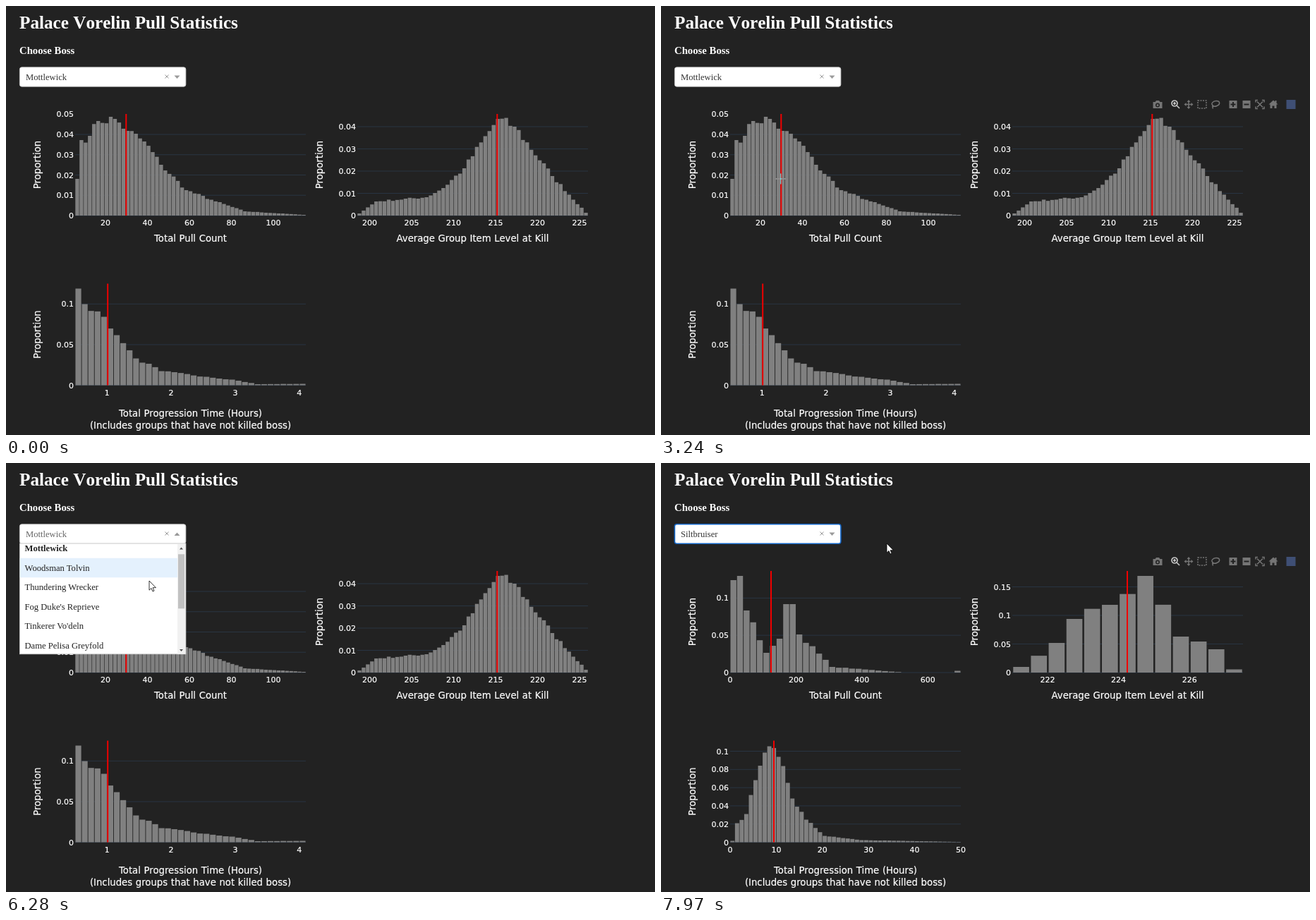
Animation of 920 by 608 pixels, one loop 8 s. Source, as an HTML page:

```html
<!DOCTYPE html>
<html lang="en">
<head>
<meta charset="utf-8">
<title>Pull Statistics</title>
<style>
html, body { margin: 0; width: 100%; height: 100%; overflow: hidden; background: #222; }
svg { display: block; width: 920px; height: 608px; font: 12.6px "Liberation Serif", serif; }
.head { font-weight: bold; font-kerning: none; fill: #fff; }
.plot text { font: 11px "DejaVu Sans", sans-serif; fill: #fff; stroke: #fff; stroke-width: .2; }
.plot .title { font-size: 13.25px; word-spacing: .03em; text-anchor: middle; }
.tip text { font: 10.2px "Liberation Sans", sans-serif; }
.cross { stroke: #fff; fill: none; }
</style>
</head>
<body>
<svg id="stage" viewBox="0 0 920 608"></svg>
<script>
const LOOP = 8000, ROW = 27.5, MENU_TOP = 114, MAX_SCROLL = 118, SWITCH = 7770;
const PLOT_W = 327, PLOT_H = 144;
const bosses = ["Mottlewick", "Woodsman Tolvin", "Thundering Wrecker", "Fog Duke's Reprieve",
  "Tinkerer Vo'deln", "Dame Pelisa Greyfold", "The Assembly of Ash", "Siltbruiser",
  "Brass Cohort Marshals", "Lord Calvorien"];

// Left edge, base line, x title lines
const slots = [
  [98, 297, ["Total Pull Count"]],
  [498, 297, ["Average Group Item Level at Kill"]],
  [98, 537.5, ["Total Progression Time (Hours)", "(Includes groups that have not killed boss)"]]
];

// y: step, pixels per step, count; x: first value, step, first pixel, pixels per step, count
// shape: [bin, height] at the bends of the histogram outline
const before = [
  { y: [.01, 28.75, 5], x: [20, 20, 141, 59.5, 5], red: 170.3, bins: 55,
    shape: [[0, 52], [1, 107], [3, 113], [5, 134], [9, 137], [12, 120], [16, 105], [20, 72], [26, 36],
      [33, 20.1085], [40, 6], [54, 1]] },
  { y: [.01, 31.5, 4], x: [200, 5, 515.5, 59.5, 6], red: 696.3, bins: 55,
    shape: [[0, 3], [4, 20], [16, 26], [20, 39], [25, 67], [33, 137], [37, 126], [46, 56], [54, 4]] },
  { y: [.05, 57.6, 2], x: [1, 1, 143.3, 90.8, 4], red: 144.2, bins: 36,
    shape: [[0, 137], [1, 115], [4, 97], [6, 71], [9, 38], [13, 20], [20, 12], [24, 8], [28, 1.5], [35, 2]] }
];
const after = [
  { y: [.05, 52.8, 2], x: [0, 200, 98, 93.4, 4], red: 156, bins: 35,
    shape: [[0, 131], [1, 137], [2, 88], [5, 28], [7, 48], [8, 97], [9, 97], [10, 54], [15, 8], [26, 0],
      [33, 0], [34, 2.5]] },
  { y: [.05, 40.5, 3], x: [222, 2, 548, 100.6, 3], red: 661, bins: 13,
    shape: [[0, 8], [2, 42], [3, 76], [5, 96], [7, 137], [9, 51], [11, 33], [12, 4.5]] },
  { y: [.02, 25.8, 5], x: [0, 10, 98, 65.4, 6], red: 160, bins: 50,
    shape: [[0, 2], [1, 27], [3, 40], [5, 88], [8, 136], [11, 108], [13, 62], [16, 32], [20, 9], [28, 3],
      [49, .5]] }
];

// Cursor path: time, x, y
const track = [[530, 916, 596], [1330, 521, 360], [1600, 405, 292], [2050, 280, 271], [2380, 213, 247],
  [3060, 177, 245], [3240, 170, 245], [3830, 133, 239], [4300, 127, 223], [4970, 212, 114],
  [5360, 203, 98], [5830, 203, 98], [6250, 203, 167], [6690, 203, 167], [6970, 166, 202],
  [7600, 166, 202], [7940, 320, 114]];

const ramp = (t, a, b) => Math.min(1, Math.max(0, (t - a) / (b - a)));
const within = (t, a, b) => t >= a && t < b;

// Linear interpolation of rows [key, ...values]
function along(rows, key) {
  const i = Math.max(1, rows.findIndex(r => r[0] >= key));
  const b = key > rows[rows.length - 1][0] ? rows[rows.length - 1] : rows[i], a = rows[rows.indexOf(b) - 1];
  const p = ramp(key, a[0], b[0]);
  return a.slice(1).map((v, k) => v + (b[k + 1] - v) * p);
}

let seed = 7;
const random = () => (seed = seed * 16807 % 2147483647) / 2147483647;

// Bends keep their height, bars between them vary a little
const heights = ({ shape, bins }) => Array.from({ length: bins }, (_, i) => {
  const jitter = shape.some(s => s[0] === i) ? 1 : .94 + .12 * random();
  return along(shape, i)[0] * jitter;
});
for (const c of [...before, ...after]) c.h = heights(c);

const rect = (x, y, w, h, fill, more = "") =>
  `<rect x="${x}" y="${y}" width="${w}" height="${h}" fill="${fill}" ${more}/>`;
const text = (x, y, s, more = "") => `<text x="${x}" y="${y}" ${more}>${s}</text>`;
const path = (d, more = "") => `<path d="${d}" ${more}/>`;

function chart({ y, x, red, h }, i) {
  const [left, base, titles] = slots[i], w = PLOT_W / h.length;
  let s = "";
  for (let k = 0; k <= y[2]; k++) {
    const rise = k * y[1];
    if (rise < PLOT_H - 1) s += path(`M${left} ${base - rise}h${PLOT_W}`, 'stroke="#283442"');
    s += text(left - 2, base - rise + 4, +(k * y[0]).toFixed(2), 'text-anchor="end"');
  }
  h.forEach((v, k) => s += rect(left + (k + .05) * w, base - v, w * .9, v, "#808080"));
  for (let k = 0; k < x[4]; k++)
    s += text(x[2] + k * x[3], base + 14, x[0] + k * x[1], 'text-anchor="middle"');
  s += path(`M${red} ${base - PLOT_H}V${base}`, 'stroke="#f00000" stroke-width="2"');
  s += text(0, 0, "Proportion", `class="title" transform="translate(${left - 49} ${base - 72}) rotate(-90)"`);
  const first = titles.length > 1 ? 44 : 36.5;
  titles.forEach((t, k) => s += text(left + PLOT_W / 2, base + first + k * 17, t, 'class="title"'));
  return s;
}

const icon = (x, d, more = "") => path(d, `transform="translate(${x} 139.5)" ${more}`);
const line = 'fill="none" stroke="#757575" stroke-width="1.5"';
const modebar =
  icon(704, "M-6.5-3.5h3l1.5-2h4l1.5 2h3v9h-13zM3 1a3 3 0 1 0-6 0a3 3 0 1 0 6 0M1.5 1a1.5 1.5 0 1 1-3 0a1.5 1.5 0 1 1 3 0", 'fill-rule="evenodd"') +
  icon(729, "M3-1.5a4 4 0 1 0-8 0a4 4 0 1 0 8 0M2 1.5l4 4M-3-1.5h4M-1-3.5v4", 'fill="none" stroke="#c4c4c4" stroke-width="1.7"') +
  icon(748, "M-5 0H5M0-5V5", line) +
  icon(748, "M-6.5 0l3-2.5v5zM6.5 0l-3-2.5v5zM0-6.5l-2.5 3h5zM0 6.5l-2.5-3h5z") +
  icon(767, "M-6-5.5H6V5.5H-6z", line + ' stroke-dasharray="2 1.5"') +
  icon(786, "M-3 2C-8-1-3-5 1-5C7-5 7 0 2 2C0 3-2 3-4 2C-5 4-3 4-4 6", line) +
  icon(811, "M-5.5-5.5h11v11h-11zM-3.5-1v2h2.5v2.5h2v-2.5h2.5v-2h-2.5v-2.5h-2v2.5z", 'fill-rule="evenodd"') +
  icon(830, "M-5.5-5.5h11v11h-11zM-3.5-1v2h7v-2z", 'fill-rule="evenodd"') +
  icon(849, "M-6-3v-3h3M3-6h3v3M6 3v3h-3M-3 6h-3v-3M-4-4l8 8M4-4l-8 8", line) +
  icon(868, "M-6.5 0L0-6l2.5 2.3v-1.8h2v3.6L6.5 0H4.5v5.5h-3v-3.5h-3v3.5h-3V0z") +
  rect(886.5, 133, 13, 13, "#3f4f75");

const rows = bosses.map((b, i) =>
  text(26.5, MENU_TOP + (i + .5) * ROW + 4, b, i ? "" : 'font-weight="bold"')).join("");

const stage = document.getElementById("stage");
stage.innerHTML = `
<clipPath id="view">${rect(19.5, MENU_TOP, 235.3, 156.8, "#fff")}</clipPath>
${rect(0, 0, 920, 608, "#222")}
<g class="head">
  ${text(19, 32, "Palace Vorelin Pull Statistics", 'font-size="25.2"')}
  ${text(19, 68, "Choose Boss", 'font-size="14.75"')}
</g>
<g id="old" class="plot">${before.map(chart).join("")}</g>
<g id="new" class="plot">${after.map(chart).join("")}</g>
<g id="bar" fill="#757575">${modebar}</g>
<g id="tip" class="tip">
  <path id="tipBox" fill="#808080" stroke="#444"/>
  <text id="tipText" fill="#444"></text>
  <text id="tipName" fill="#808080">Pull Count</text>
</g>
${rect(19.4, 86.8, 235.5, 27.4, "#fff", 'id="box" rx="3"')}
<text id="value" x="28" y="105"></text>
${path("M225.5 97.5l5 5m0-5l-5 5", 'stroke="#999"')}
<path id="arrow" fill="#999"/>
${rect(28, 94, 1, 14, "#222", 'id="caret"')}
<g id="menu">
  ${rect(19.4, MENU_TOP, 235.5, 156.8, "#fff", 'stroke="#ccc" stroke-width=".8"')}
  <g clip-path="url(#view)" fill="#222">
    <g id="list">${rect(19.5, 0, 223.5, ROW, "#e4f1fd", 'id="hot"')}${rows}</g>
    ${rect(243, MENU_TOP, 11, 157, "#f1f1f1")}
    ${rect(244, 126, 9, 77, "#c1c1c1", 'id="thumb"')}
    ${path("M246 122.5l2.5-3 2.5 3zM246 264l2.5 3 2.5-3z", 'fill="#505050"')}
  </g>
  ${path("M20 114.2H254.5", 'stroke="#e0e0e0"')}
</g>
<circle id="click" r="9" fill="#f7ee3a" opacity=".75"/>
<path id="pointer" d="M0 0V13.2L3 10.5 5 15 7 14.1 5.1 9.7H9.4Z" fill="#fff" stroke="#000" stroke-width=".8"/>
<path id="invert" class="cross" d="M-7.5 0h15M0-7.5v15" style="mix-blend-mode:difference"/>
<path id="glow" class="cross" d="M-7.5 0h15M0-7.5v15" opacity=".22"/>`;

const $ = id => document.getElementById(id);
const show = (id, on) => $(id).style.display = on ? "" : "none";
const set = (id, attrs) => { for (const k in attrs) $(id).setAttribute(k, attrs[k]); };
const inPlot = (x, y) => slots.some(([l, b]) => within(x, l, l + PLOT_W) && within(y, b - PLOT_H, b));

function drawTip(t, [hx, hy]) {
  const { h } = before[0], [left, base] = slots[0], w = PLOT_W / h.length;
  const i = Math.floor((hx - left) / w);
  const on = (within(t, 1600, 3060) || within(t, 3310, 4030)) && i in h && inPlot(hx, hy);
  show("tip", on);
  if (!on) return;
  const x = left + (i + .5) * w, y = base - h[i], low = 6 + 2 * i;
  $("tipText").textContent = `(${low} - ${low + 1}, ${+(h[i] / 2875).toPrecision(7)})`;
  const width = $("tipText").getComputedTextLength() + 6.5;
  set("tipBox", { d: `M${x + .8} ${y}l4.5-4.5v-4h${width}v17h-${width}v-4z` });
  set("tipText", { x: x + 9, y: y + 4 });
  set("tipName", { x: x + width + 8, y: y + 4 });
}

function draw(t) {
  const q = 530 + 66.2 * Math.floor((t - 518) / 66.2);
  const [x, y] = along(track, q), at = { transform: `translate(${x} ${y})` };
  const open = within(t, 5690, 7500), picked = t >= 7500;

  show("old", t < SWITCH);
  show("new", t >= SWITCH);
  set("bar", { opacity: ramp(t, 640, 940) - ramp(t, 4900, 5200) + ramp(t, 7540, 7840) });
  drawTip(t, along(track, q - 60));

  set("box", { stroke: picked ? "#1467c8" : "#ccc", "stroke-width": picked ? 1.6 : .8 });
  $("value").textContent = bosses[picked ? 7 : 0];
  set("value", { fill: open ? "#666" : "#333" });
  set("arrow", { d: open ? "M238.5 103l4-4.5 4 4.5z" : "M238.5 98.5l4 4.5 4-4.5z" });
  show("caret", within(t, 5690, 6150) || within(t, 6710, 7230));

  show("menu", open);
  const p = ramp(q, 6230, 6640), scroll = MAX_SCROLL * p * p * (3 - 2 * p);
  const seen = p < 1 ? 0 : scroll; // hover follows only once scrolling rests
  const hot = Math.max(0, Math.floor((y - MENU_TOP + seen) / ROW));
  set("list", { transform: `translate(0 ${-scroll})` });
  set("hot", { y: MENU_TOP + hot * ROW });
  set("thumb", { y: 126 + scroll * .49 });

  const cross = !open && inPlot(x, y);
  show("pointer", t >= 530 && !cross);
  show("invert", t >= 530 && cross);
  show("glow", t >= 530 && cross);
  show("click", within(t, 5620, 5700) || within(t, 7430, 7570));
  ["pointer", "invert", "glow", "click"].forEach(id => set(id, at));
}

const start = performance.now();
function tick() {
  draw((performance.now() - start) % LOOP);
  requestAnimationFrame(tick);
}
tick();
</script>
</body>
</html>
```
